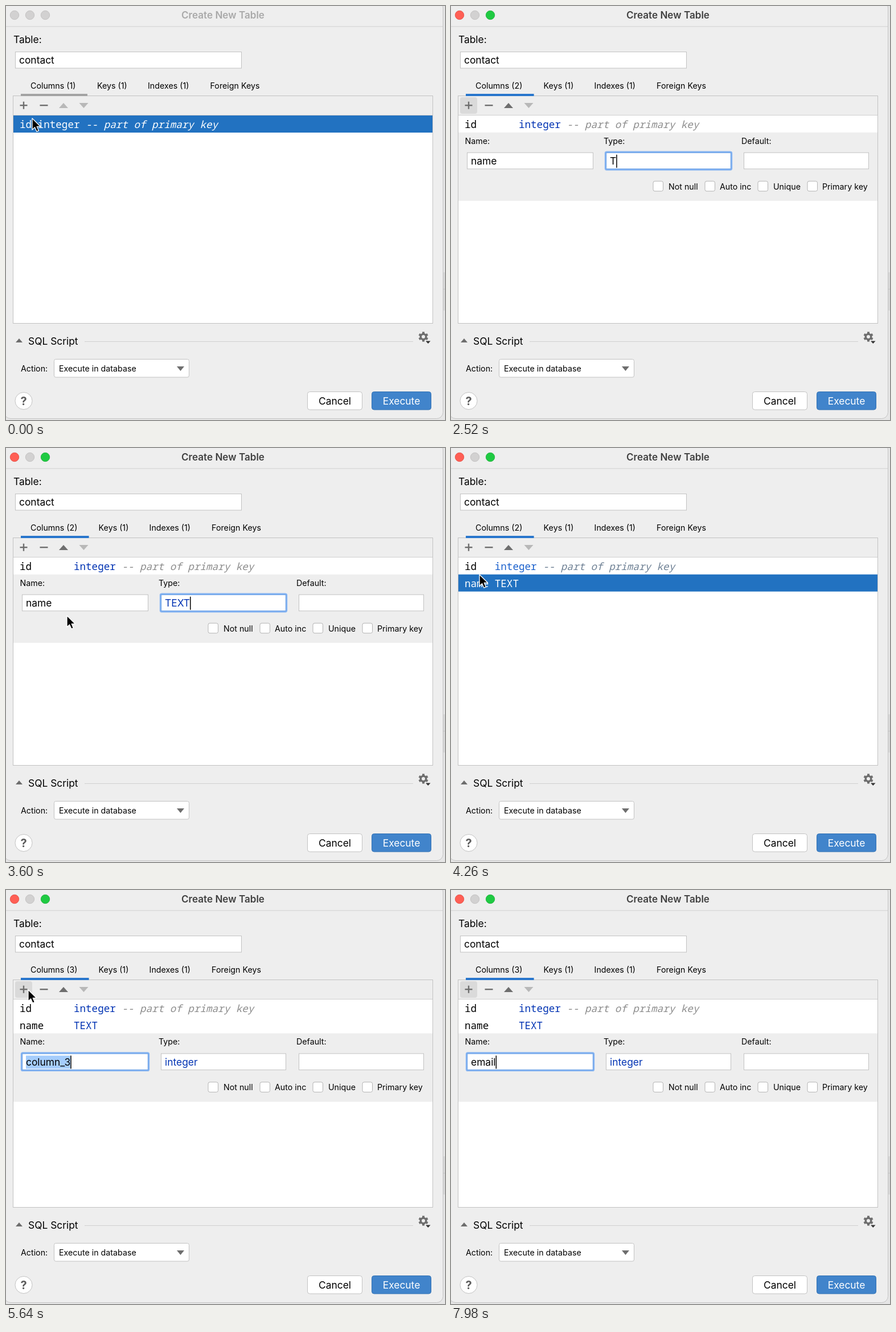
These frames come from a looping animation (771 px wide and 726 px high, 8 s). An HTML page:

```html
<!DOCTYPE html>
<html lang="en">
<head>
<meta charset="utf-8">
<title>Create New Table</title>
<style>
  html, body { margin: 0; width: 100%; height: 100%; overflow: hidden; background: #e6e6e6; }
  svg { display: block; width: 100%; height: 100%; }
  text { font-family: Inter, sans-serif; }
  .small { font-size: 14.25px; }
  .big { font-size: 17.4px; }
  .code { font-family: "Noto Sans Mono", monospace; font-size: 17.58px; }
</style>
</head>
<body>
<svg id="stage" viewBox="0 0 771 726" preserveAspectRatio="none"></svg>
<script>
const LOOP = 8000, STEP = 60;
const ACTIVATE = 300, OPEN1 = 420, CLOSE1 = 3960, CLOSED1 = 4200, OPEN2 = 5160;
const OPENING = 216, ROW = 29.7, FULL = 120, CHAR = 10.55;
const TAB = 2040;
const NAME1 = [1320, 1440, 1620, 1740];
const TYPE1 = [2460, 2700, 2940, 3120];
const NAME2 = [6660, 6840, 7080, 7320, 7500];
const POINTER = [
  [0, 46, 197], [60, 46, 197], [300, 33, 179], [3420, 33, 179], [3600, 107, 294],
  [3780, 112, 300], [3960, 105, 292], [4260, 50, 222], [4500, 39, 175], [LOOP, 39, 175]
];
const GREY = '#6e6e6e', PALE = '#b8b8b8', EDGE = '#c2c2c2', BLUE = '#0033b3', PANEL = '#eeeeee';

const stage = document.getElementById('stage');
const pen = document.createElement('canvas').getContext('2d');
pen.font = '17.4px Inter, sans-serif';
const widthOf = s => pen.measureText(s).width;
const clamp = v => Math.max(0, Math.min(1, v));

const rect = (x, y, w, h, fill, extra = '') =>
  `<rect x="${x}" y="${y}" width="${w}" height="${h}" fill="${fill}" ${extra}/>`;
const box = (x, y, w, h, rx = 0, fill = '#fff', line = EDGE) =>
  rect(x, y, w, h, fill, `rx="${rx}" stroke="${line}"`);
const label = (x, y, s, cls = 'small', fill = '#000', extra = '') =>
  `<text x="${x}" y="${y}" class="${cls}" fill="${fill}" ${extra}>${s}</text>`;
const path = (d, fill) => `<path d="${d}" fill="${fill}"/>`;
const dot = (x, fill, line) => `<circle cx="${x}" cy="16" r="7.7" fill="${fill}" stroke="${line}" stroke-width=".8"/>`;

function pointerAt(t) {
  const i = POINTER.findIndex((p, n) => n && t <= p[0]);
  const [t0, x0, y0] = POINTER[i - 1], [t1, x1, y1] = POINTER[i];
  const u = clamp((t - t0) / (t1 - t0)), k = u * u * (3 - 2 * u);
  return { x: x0 + (x1 - x0) * k, y: y0 + (y1 - y0) * k };
}

function gear(x, y) {
  let s = `<circle cx="${x}" cy="${y}" r="4.7" fill="none" stroke="${GREY}" stroke-width="3.4"/>`;
  for (let a = 0; a < 360; a += 60)
    s += rect(x - 2, y - 8.6, 4, 4, GREY, `transform="rotate(${a} ${x} ${y})"`);
  return s + path('M737 587.5h8.5l-4.2 4.5z', '#333');
}

function frame() {
  return rect(0, 0, 771, 726, '#e6e6e6') + rect(768, 467, 3, 67, '#d8d8d8') + rect(768, 496, 3, 1, '#c4c4c4') +
    box(-3, -8, 770.5, 731.5, 11, PANEL, '#c3c3c3') + rect(0, 35.5, 767, 1, '#d2d2d2') +
    label(13, 65, 'Table:', 'big') + box(16.5, 80.5, 397, 28.5) + label(23, 101, 'contact', 'big') +
    box(12.5, 157.5, 737, 399, 0, PANEL) + rect(13, 191, 736, 365, '#fff') + rect(13, 191, 736, 1, '#cfcfcf') +
    path('M17 590h12l-6-7z', GREY) + label(39, 594, 'SQL Script', 'big') + rect(138, 588, 577, 1, '#d0d0d0') + gear(733, 580) +
    label(26, 641, 'Action:') + box(84.5, 619.5, 237, 31.5, 3) + label(93, 641, 'Execute in database') +
    path('M300 632h13l-6.5 8z', GREY) +
    '<circle cx="31" cy="692.5" r="15" fill="#fff" stroke="#c2c2c2"/>' +
    label(31, 699.5, '?', '', '#5c5c5c', 'font-size="20" font-weight="700" text-anchor="middle"') +
    box(529.5, 676.5, 96, 31.5, 4) + label(577.5, 699, 'Cancel', 'big', '#000', 'text-anchor="middle"') +
    box(642.5, 676.5, 104, 31.5, 4, '#4184cb', '#3272b5') +
    label(694.5, 699, 'Execute', 'big', '#fff', 'text-anchor="middle"');
}

function titleBar(active) {
  const off = ['#d2d1d1', '#bdbcbc'];
  return dot(15, ...(active ? ['#ff5f55', '#e2473e'] : off)) + dot(42, ...off) +
    dot(69, ...(active ? ['#1fca42', '#18ac35'] : off)) +
    label(381, 22, 'Create New Table', '', active ? '#404040' : '#a9a9a9',
      'font-size="17.1" font-weight="600" text-anchor="middle"');
}

function tabs(count, active) {
  const dx = count > 1 ? 2.6 : 0;
  return label(43, 145, `Columns (${count})`) + label(160 + dx, 145, 'Keys (1)') +
    label(249 + dx, 145, 'Indexes (1)') + label(358.5 + dx, 145, 'Foreign Keys') +
    rect(26, 154, 117 + dx, 4, active ? '#2876cc' : '#a3a3a3');
}

function toolbar(hover, canRaise) {
  return (hover ? rect(16, 160, 30, 29, '#dadada', 'rx="4"') : '') +
    rect(24.5, 173, 13, 2.4, GREY) + rect(29.8, 167.7, 2.4, 13, GREY) + rect(59.5, 173, 14, 2.4, GREY) +
    path('M93 179h16l-8-9z', canRaise ? GREY : PALE) + path('M128.500 170h16l-8 9z', PALE);
}

function row(i, name, type, note, pad, look) {
  const y = 192 + i * ROW, base = y + 22, x = 24 + pad * CHAR;
  const [ink, typeInk, noteInk] = look === 'selected' ? ['#fff', '#fff', '#fff']
    : look === 'idle' ? ['#000', '#1a60cc', '#6e8094'] : ['#000', BLUE, '#8c8c8c'];
  return (look === 'selected' ? rect(13, y, 736, ROW + .3, '#2272c1') : '') +
    label(24, base, name, 'code', ink) + label(x, base, type, 'code', typeInk) +
    label(x + (type.length + 1) * CHAR, base, note, 'code', noteInk, 'font-style="italic"');
}

function field(x, y, w, value, ink, focus) {
  let s = box(x, y, w, 28.5);
  if (focus) s = rect(x - 1, y - 1, w + 2, 30.5, '#fff', 'rx="2" stroke="#85b4f2" stroke-width="3.4"') +
    rect(x, y, w, 28.5, 'none', 'stroke="#6fa2e4"');
  const tx = x + 6.5, w2 = widthOf(value);
  if (focus && focus.selected) s += rect(tx, y + 3.5, w2, 23, '#a5cdfc');
  s += label(tx, y + 20.8, value, 'big', ink);
  if (focus && focus.caret) s += rect(tx + w2, y + 3.5, 1.5, 23, '#000');
  return s;
}

function editor(y, h, e) {
  const checks = [[355, 382, 'Not null'], [446, 472, 'Auto inc'], [539, 566, 'Unique'], [626, 652, 'Primary key']];
  const focus = { selected: e.selected, caret: e.caret };
  return rect(13, y, 736, h, PANEL) +
    `<clipPath id="cut">${rect(13, y, 736, Math.max(0, h - 4.5), '#000')}</clipPath><g clip-path="url(#cut)">` +
    label(24.5, y + 20, 'Name:') + label(268, y + 20, 'Type:') + label(510, y + 20, 'Default:') +
    field(28.5, y + 35.5, 221, e.name, '#000', e.inType ? null : focus) +
    field(272.5, y + 35.5, 219, e.type, e.known ? BLUE : '#000', e.inType ? focus : null) +
    field(514.5, y + 35.5, 219, '', '#000', null) +
    checks.map(([cx, tx, s]) => box(cx, y + 85.5, 17.5, 17.5, 3, '#fff', '#b4b4b4') + label(tx, y + 99.8, s)).join('') +
    '</g>';
}

// How much of a word has been typed, and when the last key fell.
const typed = (word, keys, t) => word.slice(0, keys.filter(k => k <= t).length);
const lastKey = (keys, t) => Math.max(...keys.filter(k => k <= t));
const blink = (keys, t) => (t - lastKey(keys, t)) % 1000 < 500;

function firstEdit(t) {
  const name = typed('name', NAME1, t), type = typed('TEXT', TYPE1, t), inType = t >= TAB;
  return {
    name: name || 'column_2', type: type || 'integer', inType,
    known: !type || type === 'TEXT',
    selected: inType ? !type : !name,
    caret: blink([OPEN1, ...NAME1, TAB, ...TYPE1], t)
  };
}

function secondEdit(t) {
  const name = typed('email', NAME2, t);
  return { name: name || 'column_3', type: 'integer', known: true, selected: !name, caret: blink([OPEN2, ...NAME2], t) };
}

function list(t) {
  const note = '-- part of primary key', y = 192 + ROW;
  const grow = start => ROW + (FULL - ROW) * clamp((t - start) / OPENING);
  if (t < OPEN1) return row(0, 'id', 'integer', note, 3, 'selected');
  if (t < CLOSED1) {
    const shut = (FULL - ROW) * clamp((t - CLOSE1) / (CLOSED1 - CLOSE1));
    return row(0, 'id', 'integer', note, 9) + editor(y, grow(OPEN1) - shut, firstEdit(t));
  }
  if (t < OPEN2) return row(0, 'id', 'integer', note, 5, 'idle') + row(1, 'name', 'TEXT', '', 5, 'selected');
  return row(0, 'id', 'integer', note, 9) + row(1, 'name', 'TEXT', '', 9) + editor(y + ROW, grow(OPEN2), secondEdit(t));
}

function pointer(p) {
  return `<path transform="translate(${p.x} ${p.y})" d="M0 0V20L4.600 15.700 7.900 23.200 11.400 21.700 8.200 14.300H14.400Z"
    fill="#000" stroke="#fff" stroke-width="1.300" stroke-linejoin="round"/>`;
}

function view(t) {
  const active = t >= ACTIVATE, p = pointerAt(t);
  const hover = active && p.x > 16 && p.x < 46 && p.y > 160 && p.y < 189;
  const hidden = (t >= NAME1[0] && t < 3420) || t >= NAME2[0];
  const count = t < OPEN1 ? 1 : t < OPEN2 ? 2 : 3;
  return frame() + titleBar(active) + tabs(count, active) + toolbar(hover, t >= OPEN1 + OPENING) +
    list(t) + (hidden ? '' : pointer(p));
}

let shown = -1;
function tick() {
  const t = Math.floor(performance.now() % LOOP / STEP) * STEP;
  if (t !== shown) stage.innerHTML = view(shown = t);
  requestAnimationFrame(tick);
}
tick();
</script>
</body>
</html>
```
